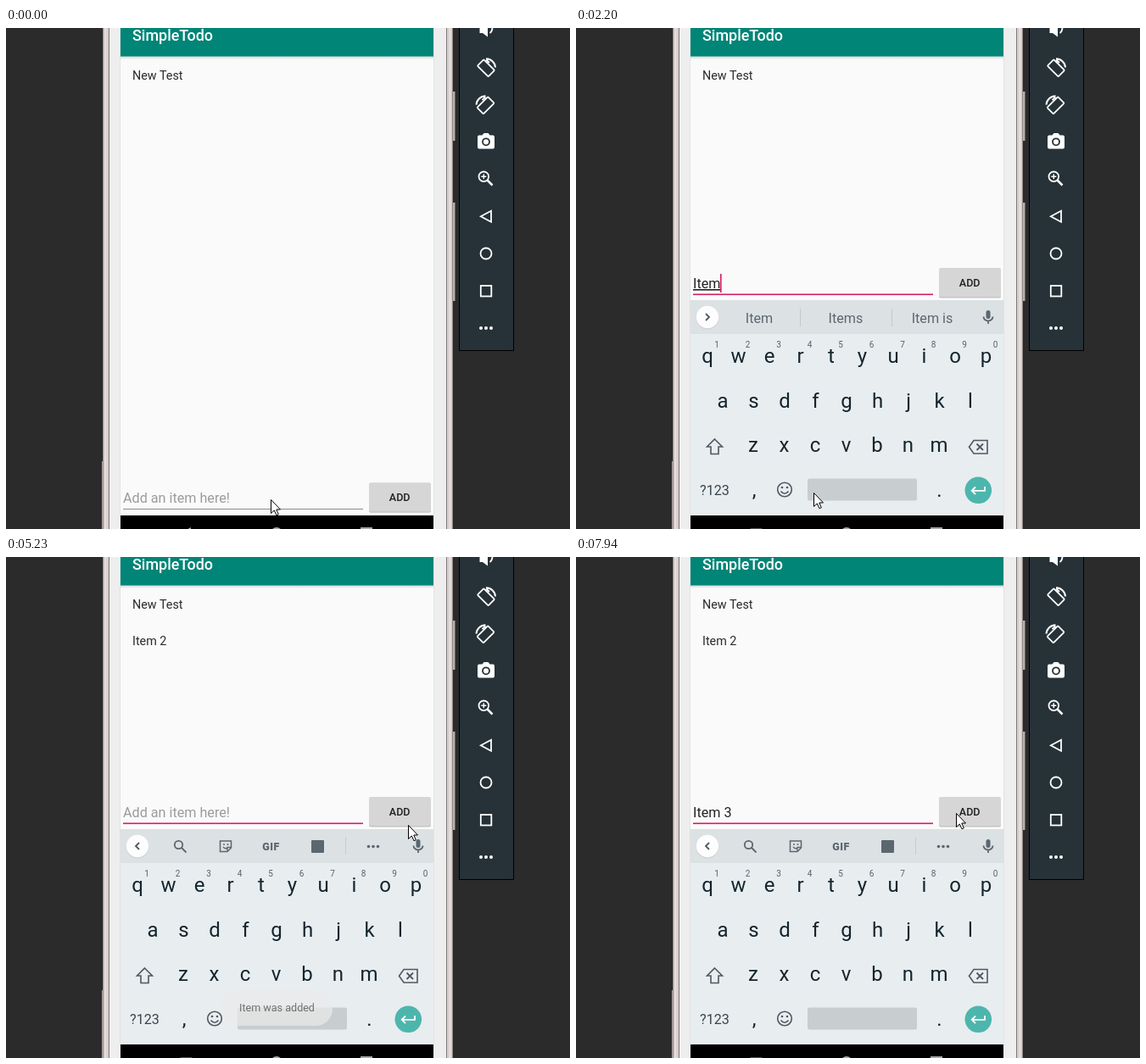
Recreate the animation shown at these times as an HTML page. Size 665 by 591 pixels, loop 8 s.

```html
<!DOCTYPE html>
<html lang="en">
<head>
<meta charset="utf-8">
<title>Todo app in an emulator</title>
<style>
html, body { margin: 0; width: 100%; height: 100%; overflow: hidden; background: #2b2b2b; }
svg { display: block; width: 100%; height: 100%; }
text { font-family: Roboto, sans-serif; white-space: pre; }
.mid { text-anchor: middle; }
.bold { font-weight: 500; }
.line { fill: none; stroke-width: 1.8; }
.item { font-size: 14.37px; fill: #2a2a2a; }
.field { font-size: 16.16px; }
.key { font-size: 24px; fill: #14252d; }
.digit { font-size: 10px; fill: #566369; }
.word { font-size: 16.16px; fill: #5b676e; }
</style>
</head>
<body>
<svg viewBox="0 0 665 591">
  <defs>
    <clipPath id="screenClip"><rect x="135" y="0" width="369" height="575"/></clipPath>
    <linearGradient id="barShadow" x2="0" y2="1">
      <stop stop-color="#cfd1d1"/><stop offset="1" stop-color="#fafafa"/>
    </linearGradient>
  </defs>
  <rect width="665" height="591" fill="#2b2b2b"/>

  <!-- phone body -->
  <g>
    <rect x="526" y="75" width="3.5" height="58" fill="#b9b3b3"/>
    <rect x="526" y="206" width="3.5" height="116" fill="#b9b3b3"/>
    <path d="M529.5 76V133M529.5 207V322" stroke="#666"/>
    <rect x="114" width="413" height="591" fill="#d9cfcf"/>
    <rect x="113" y="511" width="2" height="80" fill="#b5aaaa"/>
    <rect x="122" width="397" height="591" fill="#eeeeee"/>
    <path d="M114.5 0V591M526.5 0V591" stroke="#8d8484"/>
    <path d="M117.5 0V591M523.5 0V591" stroke="#efe8e8"/>
    <path d="M121.5 0V591M519.5 0V591" stroke="#7f7777"/>
    <path d="M134.5 0V575M504.5 0V575" stroke="#e2e2e2"/>
  </g>

  <!-- app -->
  <rect x="135" width="369" height="591" fill="#fafafa"/>
  <rect x="135" y="33" width="369" height="4" fill="url(#barShadow)"/>
  <rect x="135" width="369" height="33.5" fill="#008577"/>
  <text class="bold" x="149" y="15" font-size="17.96" fill="#fff">SimpleTodo</text>
  <text class="item" x="149" y="60.5">New Test</text>
  <text class="item" x="149" y="103.5" id="added">Item 2</text>
  <g id="entry">
    <text class="field" x="138" y="307" id="entryText"></text>
    <rect x="138" width="283" id="rule"/>
    <rect y="290" width="1.6" height="22" fill="#d81b60" id="caret"/>
    <rect x="428" y="284.5" width="73" height="34" rx="2" fill="#c4c4c4"/>
    <rect x="428" y="283" width="73" height="34" rx="2" id="button"/>
    <text class="mid bold" x="464.2" y="304.7" font-size="12.57" fill="#222">ADD</text>
  </g>

  <!-- keyboard -->
  <g clip-path="url(#screenClip)"><g id="keyboard">
    <rect x="135" y="321" width="369" height="254" fill="#e8edf0"/>
    <rect x="135" y="321" width="369" height="40" fill="#dce1e4"/>
    <circle cx="155" cy="342" r="13.5" fill="#cdd2d5"/>
    <circle cx="155" cy="341" r="13.2" fill="#fdfdfd"/>
    <path class="line" stroke="#4d5960" id="chevron" d="M157 337L153 341L157 345"/>
    <g id="tools" fill="#5b676e" stroke="#5b676e">
      <g class="line">
        <circle cx="203.5" cy="339.5" r="4.7"/><path d="M207 343L212.500 348.500"/>
        <path d="M252.500 335H265.500V343L261 347.500H252.500Z" stroke-width="1.5"/>
        <path d="M256 342Q259 345.500 262 342M265 342.500H261V347" stroke-width="1.3"/>
        <path d="M400.500 331V351" stroke="#c5cbcf" stroke-width="1"/>
      </g>
      <g stroke="none">
        <circle cx="257" cy="339" r="1"/><circle cx="261.500" cy="339" r="1"/>
        <text class="mid" x="312.500" y="345.500" font-size="12.5" font-weight="900" letter-spacing=".5">GIF</text>
        <rect x="360" y="334" width="15" height="15" rx="1"/>
        <circle cx="427.500" cy="341.500" r="1.8"/><circle cx="433" cy="341.500" r="1.8"/><circle cx="438.500" cy="341.500" r="1.8"/>
      </g>
    </g>
    <g id="words">
      <path d="M264.500 331V352M372.500 331V352" stroke="#c2c8cc"/>
      <text class="mid word" x="216" y="347.500"></text>
      <text class="mid word" x="318" y="347.500"></text>
      <text class="mid word" x="420" y="347.500"></text>
    </g>
    <rect x="483.500" y="333" width="5" height="10" rx="2.500" fill="#5b676e"/>
    <path class="line" d="M480.500 340.500A5.500 5 0 0 0 491.500 340.500M486 345.500V349" stroke="#5b676e" stroke-width="1.500"/>
    <g id="keys"></g>
    <g class="line" stroke="#4d5960">
      <path d="M163.500 485L172.500 494H168V502.500H159V494H154.500Z" stroke-width="1.600"/>
      <path d="M469 486.500H485V502H469L463.500 494.300Z" stroke-width="1.600"/>
      <path d="M472.500 490.500L480 498M480 490.500L472.500 498"/>
      <circle cx="246" cy="544.500" r="8.300" stroke-width="1.600"/>
      <path d="M241.500 546.500Q246 552 250.500 546.500" stroke-width="1.600"/>
    </g>
    <circle cx="243" cy="542" r="1.300" fill="#4d5960"/><circle cx="249" cy="542" r="1.300" fill="#4d5960"/>
    <text class="mid" x="163.500" y="550.500" font-size="16.160" fill="#38464d">?123</text>
    <text class="mid key" x="210" y="553">,</text>
    <text class="mid key" x="428.500" y="553">.</text>
    <rect x="273" y="531.500" width="129" height="26" rx="2.500" fill="#c8cdd0"/>
    <circle cx="474.300" cy="545.300" r="15.800" fill="#4db6ac"/>
    <path class="line" stroke="#fff" d="M482 541V545.800H467M471 541.500L466.700 545.800L471 550"/>
  </g></g>

  <g id="toast">
    <rect x="254" y="511" width="131" height="42" rx="20" fill="#ebebeb"/>
    <text class="mid" x="319.500" y="536" font-size="12.570" fill="#444">Item was added</text>
  </g>

  <!-- navigation bar -->
  <rect x="135" y="575" width="369" height="16" fill="#000"/>
  <g fill="#a8a8a8">
    <path id="back" d="M205 596L218 589V603Z"/>
    <circle cx="319" cy="596" r="7"/><rect x="418" y="589" width="14" height="14"/>
  </g>

  <!-- emulator panel -->
  <rect x="534.500" y="-1" width="64" height="381.500" fill="#263238" stroke="#000"/>
  <path d="M558.500 -2H562L568 -8V10.500L562 6H558.500Z" fill="#fff"/>
  <path class="line" stroke="#fff" d="M570.500 6Q573.500 4 573.500 -1"/>
  <g id="rotate" class="line" stroke="#fff">
    <rect x="557" y="42" width="18" height="10.500" rx="1" transform="rotate(45 566 47.200)"/>
    <path d="M566 36.200A11 11 0 0 1 577 46.500M566 37.500L570 41" stroke-width="2"/>
  </g>
  <use href="#rotate" transform="translate(1131.500 44) scale(-1 1)"/>
  <path d="M558 126.500H561.500L563.500 124H568.500L570.500 126.500H574Q576 126.500 576 128.500V140.500Q576 142.500 574 142.500H558Q556 142.500 556 140.500V128.500Q556 126.500 558 126.500Z" fill="#fff"/>
  <circle class="line" cx="566" cy="134.300" r="4" stroke="#263238" stroke-width="2"/>
  <g class="line" stroke="#fff">
    <circle cx="563.300" cy="175.300" r="5.800"/>
    <path d="M567.500 179.500L573.500 185.500" stroke-width="2.500"/>
    <path d="M560.300 175.300H566.300M563.300 172.300V178.300" stroke-width="1.400"/>
    <path d="M559.800 222.300L572 215.800V228.800Z"/>
    <circle cx="566" cy="266" r="6.500"/>
    <rect x="559.800" y="304" width="12.500" height="12.500"/>
  </g>
  <g fill="#fff"><circle cx="560" cy="354" r="2"/><circle cx="566" cy="354" r="2"/><circle cx="572" cy="354" r="2"/></g>

  <path id="pointer" d="M.5 .5V16.500L4.300 13L7 18.800L9.300 17.800L6.800 12H11.500Z" fill="#fff" stroke="#000"/>
</svg>

<script>
const LOOP = 8000;
const $ = id => document.getElementById(id);

function addKey(label, x, y, cls) {
  const key = document.createElementNS("http://www.w3.org/2000/svg", "text");
  key.setAttribute("class", "mid " + cls);
  key.setAttribute("x", x);
  key.setAttribute("y", y);
  key.textContent = label;
  $("keys").append(key);
}
[["qwertyuiop", 155], ["asdfghjkl", 173], ["zxcvbnm", 209]].forEach(([letters, left], row) => {
  [...letters].forEach((c, i) => {
    addKey(c, left + 36.5 * i, 395 + 52.7 * row, "key");
    if (row === 0) addKey((i + 1) % 10, 166 + 36.5 * i, 377, "digit");
  });
});

const start = {
  at: [312, 556], focus: false, raised: false, keyboard: 0, back: 0,
  text: "", composing: false, words: null, caret: false,
  press: 0, added: false, toast: 0
};

// Each step changes part of the state from its time on.
const steps = [
  [120, { at: [303, 548] }],
  [550, { at: [281, 548] }],
  [670, { focus: true, caret: true }],
  [820, { raised: true, back: -60 }],
  [970, { keyboard: 0.8, back: -90, caret: true }],
  [1090, { keyboard: 1, caret: false }],
  [1370, { caret: true }],
  [1930, { text: "I", composing: true, words: ["I", "I'm", "If"] }],
  [2050, { text: "Ite", words: ["Ite", "Item", "Items"], at: [280, 548] }],
  [2200, { text: "Item", words: ["Item", "Items", "Item is"] }],
  [2480, { text: "Item ", composing: false, words: ["is", "number", "in"] }],
  [2880, { text: "Item 2", words: ["2", "2nd", "20"] }],
  [3030, { words: null }],
  [3460, { at: [420, 390], caret: false }],
  [3580, { at: [498, 285] }],
  [3730, { at: [499, 278] }],
  [3850, { at: [494, 294] }],
  [4000, { at: [486, 298], caret: true }],
  [4120, { at: [478, 300] }],
  [4270, { at: [470, 301], press: 0.6 }],
  [4390, { at: [467, 297], press: 1, caret: true }],
  [4690, { press: 0.7 }],
  [4820, { press: 0.4, text: "" }],
  [4960, { press: 0, added: true }],
  [5080, { toast: 0.25, caret: false }],
  [5230, { toast: 0.7, at: [474, 316] }],
  [5350, { toast: 1, at: [460, 316] }],
  [5470, { at: [448, 316], caret: true }],
  [5620, { at: [353, 306] }],
  [5770, { at: [335, 306] }],
  [5890, { at: [329, 306], caret: false }],
  [6450, { caret: true }],
  [6600, { text: "I", composing: true, words: ["I", "I'm", "If"] }],
  [6730, { text: "It", words: ["It", "It's", "Its"] }],
  [6850, { text: "Item", words: ["Item", "Items", "Item is"], toast: 0.75 }],
  [7000, { text: "Item ", composing: false, words: ["is", "number", "in"], toast: 0.35 }],
  [7120, { text: "Item 3", words: ["3", "3rd", "30"], toast: 0 }],
  [7270, { words: null }],
  [7700, { at: [360, 307], caret: false }],
  [7820, { at: [420, 306] }],
  [7940, { at: [448, 302] }]
];

const set = (id, attrs) => {
  for (const name in attrs) $(id).setAttribute(name, attrs[name]);
};
const show = (id, on) => set(id, { visibility: on ? "visible" : "hidden" });

function draw(time) {
  const s = Object.assign({}, start, ...steps.filter(([t]) => t <= time).map(([, change]) => change));

  show("added", s.added);
  set("entry", { transform: `translate(0 ${s.raised ? 0 : 253.3})` });
  $("entryText").textContent = s.text || "Add an item here!";
  set("entryText", {
    fill: s.text ? "#222" : "#9b9b9b",
    "text-decoration": s.composing ? "underline" : "none"
  });
  set("rule", s.focus
    ? { y: 313.5, height: 1.6, fill: "#d81b60" }
    : { y: 313.7, height: 1, fill: "#8b8b8b" });
  set("caret", { x: 138 + (s.text ? $("entryText").getComputedTextLength() - 0.4 : 0) });
  show("caret", s.caret);
  const grey = 214 - 20 * s.press;
  set("button", { fill: `rgb(${grey},${grey},${grey})` });

  set("keyboard", {
    opacity: s.keyboard,
    transform: `translate(0 ${(1 - s.keyboard) * 150})`
  });
  set("chevron", { transform: s.words ? "rotate(180 155 341)" : "" });
  set("tools", { display: s.words ? "none" : "inline" });
  set("words", { display: s.words ? "inline" : "none" });
  if (s.words) {
    $("words").querySelectorAll("text").forEach((node, i) => { node.textContent = s.words[i]; });
  }

  set("toast", { opacity: s.toast });
  set("back", { transform: `rotate(${s.back} 212.5 596)` });
  set("pointer", { transform: `translate(${s.at})` });
}

function tick(now) {
  draw(now % LOOP);
  requestAnimationFrame(tick);
}
draw(0);
requestAnimationFrame(tick);
</script>
</body>
</html>
```
